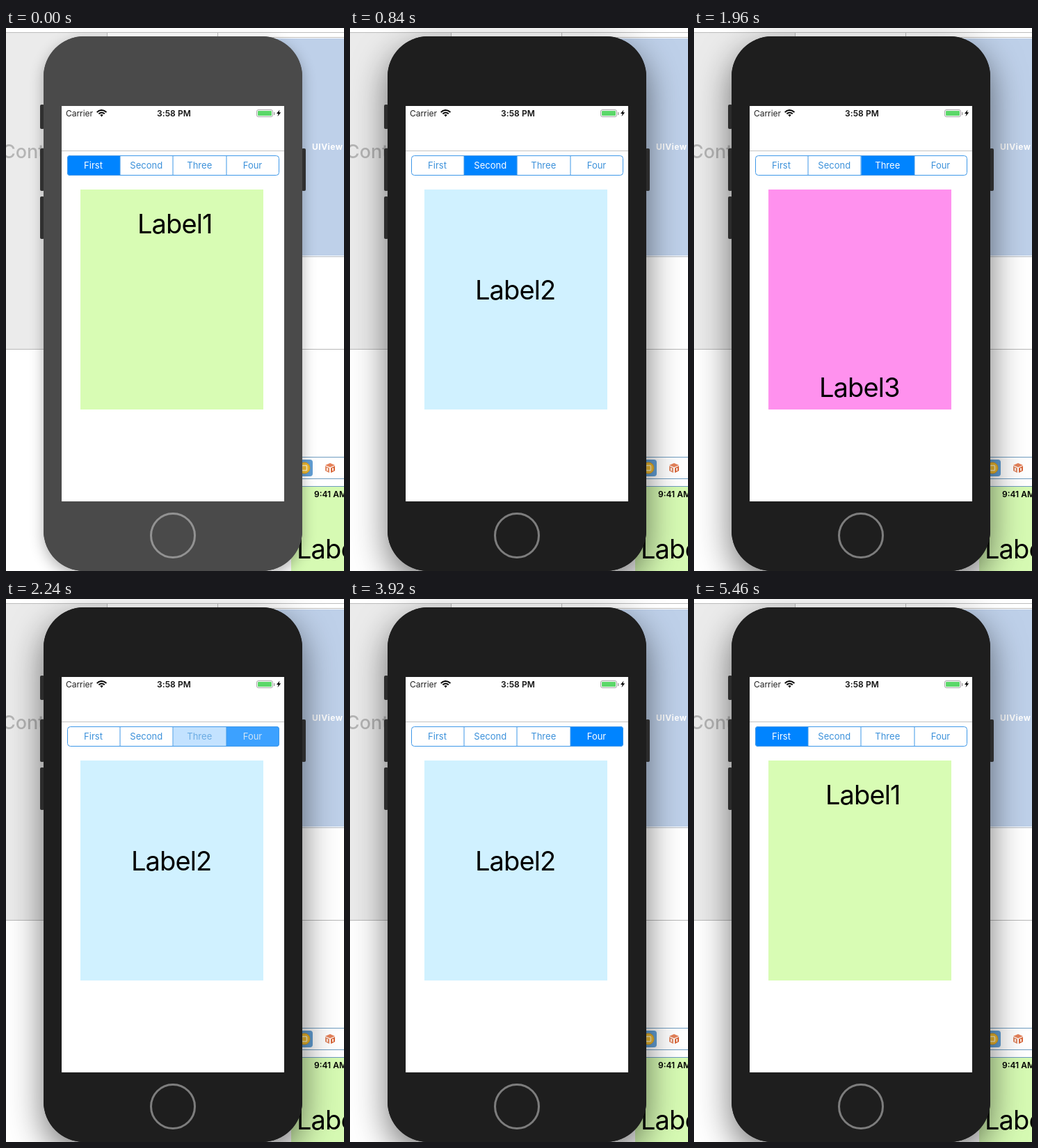
An HTML page with a canvas that plays this animation: 486 px wide and 780 px high, repeating every 5.53 s.

```html
<!DOCTYPE html>
<html>
<head>
<meta charset="utf-8">
<style>
html, body { margin: 0; width: 100%; height: 100%; overflow: hidden; background: #fff; }
canvas { display: block; }
</style>
</head>
<body>
<canvas id="stage" width="486" height="780"></canvas>
<script>
const ctx = document.getElementById('stage').getContext('2d');
const LOOP = 5530, STEP = 70, FADE = 220;
const FOCUS_AT = 70;
const TAPS = [
  { at: -FADE, tab: 0, page: 0 },
  { at: 600, tab: 1, page: 1 },
  { at: 1100, tab: 2, page: 2 },
  { at: 2072, tab: 3, page: 1 },
  { at: 4040, tab: 0, page: 0 }
];
const TABS = ['First', 'Second', 'Three', 'Four'];
const EDGES = [88, 164, 240.5, 317, 393];
const PAGES = [
  { text: 'Label1', color: '#d8fcb4', x: 189, y: 295 },
  { text: 'Label2', color: '#d0f1ff', x: 180, y: 390 },
  { text: 'Label3', color: '#ff91ee', x: 180, y: 530 }
];

function rect(x, y, w, h, color) {
  ctx.fillStyle = color;
  ctx.fillRect(x, y, w, h);
}

function round(x, y, w, h, r, fill, stroke, width = 1) {
  ctx.beginPath();
  ctx.roundRect(x, y, w, h, r);
  if (fill) { ctx.fillStyle = fill; ctx.fill(); }
  if (stroke) { ctx.strokeStyle = stroke; ctx.lineWidth = width; ctx.stroke(); }
}

function poly(points, color) {
  ctx.beginPath();
  points.forEach(([x, y]) => ctx.lineTo(x, y));
  ctx.closePath();
  ctx.fillStyle = color;
  ctx.fill();
}

function text(str, x, y, size, color, { weight = 400, gap = 0, align = 'left' } = {}) {
  ctx.font = `${weight} ${size}px Inter, sans-serif`;
  ctx.letterSpacing = gap + 'px';
  ctx.textAlign = align;
  ctx.fillStyle = color;
  ctx.fillText(str, x, y);
}

function mix(a, b, p) {
  return `rgb(${a.map((v, i) => Math.round(v + (b[i] - v) * p))})`;
}

function drawCube(x, y) {
  poly([[x, y - 7], [x + 7, y - 4], [x, y - 1], [x - 7, y - 4]], '#e5825a');
  poly([[x - 7, y - 3], [x - 1, y], [x - 1, y + 7], [x - 7, y + 4]], '#e08a66');
  poly([[x + 7, y - 3], [x + 1, y], [x + 1, y + 7], [x + 7, y + 4]], '#d9683c');
  rect(x - 5, y, 2, 4, '#fbe5da');
  rect(x + 3, y, 2, 4, '#fbe5da');
}

function drawDesktop() {
  rect(0, 0, 486, 780, '#fff');
  rect(0, 7, 145, 454, '#ebebeb');
  rect(0, 6, 486, 1, '#bdbdbd');
  rect(145, 6, 1, 455, '#bdbdbd');
  rect(304, 6, 1, 323, '#bdbdbd');
  rect(305, 13, 181, 1, '#bdbdbd');
  rect(305, 15, 181, 312, '#bed0e9');
  rect(305, 328, 181, 1, '#b5bcc5');
  rect(0, 461, 486, 1, '#b8b8b8');
  text('Cont', -6, 187, 27, '#b5b5b5', { weight: 500 });
  text('UIView', 440, 175, 12, '#fff', { weight: 700, gap: 0.5 });

  rect(410, 616, 76, 1, '#6f9cc0');
  rect(410, 647, 76, 1, '#6f9cc0');
  round(417, 620, 24, 24, 4, '#629fd5');
  round(421, 624, 16, 16, 8, '#f2bd32', '#d79c20');
  round(425.5, 628.5, 7, 7, 1, null, '#fff3c4', 1.5);
  drawCube(466, 632);

  rect(410, 658, 76, 1, '#6f9cc0');
  rect(410, 659, 76, 121, '#d6fab3');
  text('9:41 AM', 443, 674, 12, '#000', { weight: 600 });
  text('Label', 418, 762, 38, '#000', { gap: -0.9 });
}

function drawPhone(active) {
  const button = active ? '#2c2c2c' : '#303030';
  ctx.save();
  ctx.shadowColor = active ? 'rgba(0,0,0,.55)' : 'rgba(0,0,0,.3)';
  ctx.shadowBlur = active ? 50 : 20;
  ctx.shadowOffsetY = active ? 18 : 7;
  round(54, 12, 372, 768, 58, active ? '#1e1e1e' : '#4a4a4a');
  ctx.restore();
  for (const [x, y, h] of [[49, 110, 35], [49, 173, 61], [49, 242, 61], [425, 173, 61]]) {
    round(x, y, 6, h, 2, button);
  }
  round(54, 12, 372, 768, 58, active ? '#1e1e1e' : '#4a4a4a');
  round(208.5, 697.5, 63, 63, 31.5, null, active ? '#7d7d7d' : '#929292', 3);
  rect(80, 112, 320, 568, '#fff');
}

function drawStatus() {
  text('Carrier', 86, 127, 12, '#222', { gap: -0.05 });
  text('3:58 PM', 217, 127, 12, '#111', { weight: 600, gap: 0.1 });
  ctx.strokeStyle = '#000';
  ctx.lineWidth = 2;
  for (const r of [9, 5.5]) {
    ctx.beginPath();
    ctx.arc(137.5, 127, r, -Math.PI * 0.77, -Math.PI * 0.23);
    ctx.stroke();
  }
  poly([[135.2, 124.8], [137.5, 124], [139.8, 124.8], [137.5, 127.5]], '#000');

  round(360.5, 117.5, 23, 10, 2.5, '#fff', '#a5a5a5');
  round(362, 119, 20, 7, 1, '#5bd769');
  rect(385, 121, 1.5, 4, '#a5a5a5');
  poly([[393.5, 117.5], [389, 123], [391.7, 123], [390.5, 127], [395.2, 121.3], [392.5, 121.3]], '#000');
  rect(80, 176, 320, 1, '#c4c4c4');
}

function drawTabs(now, before, p) {
  const blue = [60, 145, 218], white = [255, 255, 255];
  ctx.save();
  ctx.beginPath();
  ctx.roundRect(88, 183, 305, 29, 4);
  ctx.clip();
  TABS.forEach((name, i) => {
    const lit = i === now ? p : i === before ? 1 - p : 0;
    const x = EDGES[i], w = EDGES[i + 1] - x;
    rect(x, 183, w, 29, mix(white, [0, 132, 255], lit));
    text(name, x + w / 2 - 0.5, 202, 13, mix(blue, white, lit), { align: 'center' });
  });
  ctx.restore();
  for (const x of EDGES.slice(1, 4)) rect(Math.floor(x) - 0.5, 183, 1, 29, '#3f98e8');
  round(88.5, 183.5, 304, 28, 4, null, '#3f98e8');
}

function drawPage(page) {
  rect(107, 232, 263, 316, page.color);
  text(page.text, page.x, page.y, 38, '#000', { gap: -0.9 });
}

function draw(t) {
  let k = TAPS.length - 1;
  while (TAPS[k].at > t) k--;
  const tap = TAPS[k], last = TAPS[Math.max(0, k - 1)];
  const p = Math.min(1, (t - tap.at) / FADE);
  drawDesktop();
  drawPhone(t >= FOCUS_AT);
  drawStatus();
  drawTabs(tap.tab, last.tab, p);
  drawPage(PAGES[tap.page]);
}

const start = performance.now();
function frame() {
  const t = (performance.now() - start) % LOOP;
  draw(Math.floor(t / STEP) * STEP);
  requestAnimationFrame(frame);
}
frame();
</script>
</body>
</html>
```
